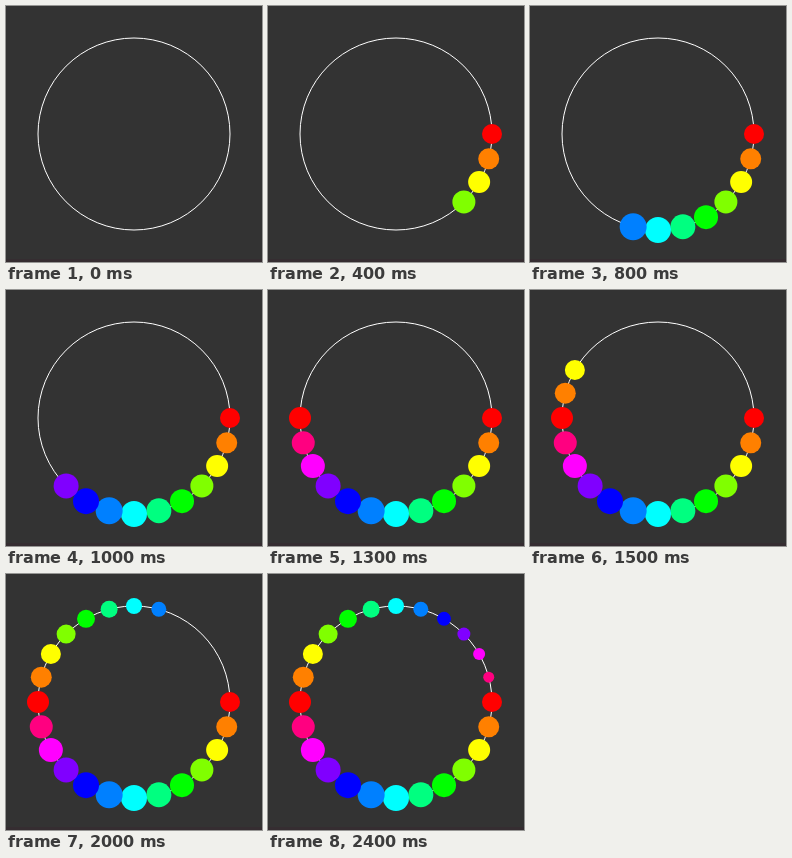
Write an HTML page that moves like this. It is 256 px wide and 256 px high and loops after 2.6 s.

```html
<!DOCTYPE html>
<html lang="en">
<head>
<meta charset="utf-8">
<title>Colour wheel of dots</title>
<style>
  html, body { margin: 0; width: 100%; height: 100%; overflow: hidden; background: #333; }
  svg { display: block; width: 100vw; height: 100vh; }
</style>
</head>
<body>
<svg id="stage" viewBox="0 0 256 256">
  <rect width="256" height="256" fill="#333"/>
  <rect y="253" width="256" height="3" fill="#352d31"/>
  <circle cx="128" cy="128" r="96" fill="none" stroke="#fff"/>
</svg>
<script>
const LOOP = 2600, STEP = 100, COUNT = 24;
const CENTER = 128, RING = 96, PEAK = 7;
const stage = document.getElementById("stage");

function makeDot(i) {
  const angle = i * 2 * Math.PI / COUNT;
  const dot = document.createElementNS("http://www.w3.org/2000/svg", "circle");
  const attributes = {
    cx: CENTER + RING * Math.cos(angle),
    cy: CENTER + RING * Math.sin(angle),
    r: 13.5 - Math.abs(i - PEAK) / 2,
    fill: `hsl(${i * 30 % 360}, 100%, 50%)`,
    visibility: "hidden"
  };
  for (const name in attributes) dot.setAttribute(name, attributes[name]);
  return stage.appendChild(dot);
}

const dots = Array.from({ length: COUNT }, (_, i) => makeDot(i));

// One more dot appears at every step; the full ring holds for two steps.
function render(time) {
  const shown = Math.floor(time % LOOP / STEP);
  dots.forEach((dot, i) =>
    dot.setAttribute("visibility", i < shown ? "visible" : "hidden"));
}

const start = performance.now();
function tick() {
  render(performance.now() - start);
  requestAnimationFrame(tick);
}
tick();
</script>
</body>
</html>
```
